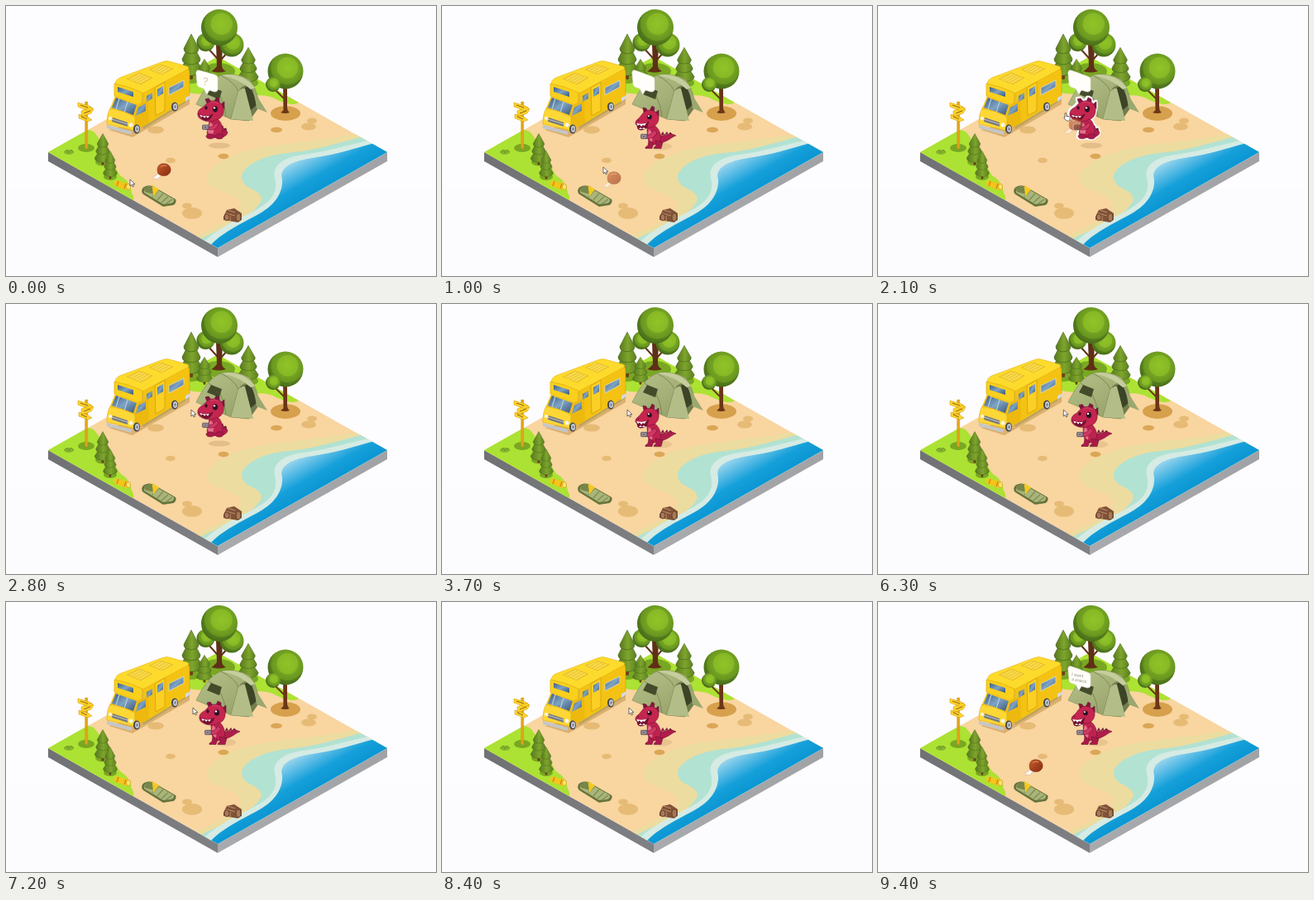
An HTML page for the animation above (9500 ms loop, 520 px wide and 327 px high).

```html
<!DOCTYPE html>
<html lang="en">
<head>
<meta charset="utf-8">
<title>Island camp</title>
<style>
html, body { margin: 0; width: 100%; height: 100%; overflow: hidden; background: #fdfcfe; }
svg { display: block; width: 100vw; height: 100vh; }
text { font-family: Inter, Arial, sans-serif; }
.ink { stroke: #6b1033; stroke-width: .55; stroke-linejoin: round; }
.glow { filter: drop-shadow(1.2px 0 0 #fff) drop-shadow(-1.2px 0 0 #fff) drop-shadow(0 1.2px 0 #fff) drop-shadow(0 -1.2px 0 #fff); }
</style>
</head>
<body>
<svg viewBox="0 0 520 327" xmlns="http://www.w3.org/2000/svg">
<defs>
  <linearGradient id="sea" gradientUnits="userSpaceOnUse" x1="340" y1="190" x2="364" y2="232">
    <stop offset="0" stop-color="#a6daf0"/><stop offset=".3" stop-color="#62bfe6"/>
    <stop offset=".65" stop-color="#16a0da"/><stop offset="1" stop-color="#0a96d3"/>
  </linearGradient>
  <linearGradient id="sideL"><stop offset="0" stop-color="#707174"/><stop offset="1" stop-color="#7f8083"/></linearGradient>
  <linearGradient id="sideR"><stop offset="0" stop-color="#a9aaae"/><stop offset="1" stop-color="#a1a2a6"/></linearGradient>
  <radialGradient id="leaf" cx=".56" cy=".4" r=".64">
    <stop offset="0" stop-color="#90c428"/><stop offset=".45" stop-color="#86b825"/>
    <stop offset=".48" stop-color="#74a322"/><stop offset=".72" stop-color="#67941f"/>
    <stop offset=".75" stop-color="#547d1c"/><stop offset="1" stop-color="#456719"/>
  </radialGradient>
  <linearGradient id="needle"><stop offset="0" stop-color="#58791f"/><stop offset=".55" stop-color="#7ea52c"/><stop offset="1" stop-color="#5c8021"/></linearGradient>
  <linearGradient id="cloth" x1="0" y1="0" x2="1" y2="1"><stop offset="0" stop-color="#b7c18b"/><stop offset=".5" stop-color="#a4b077"/><stop offset="1" stop-color="#8c9a62"/></linearGradient>
  <linearGradient id="glass" x1="0" y1="0" x2="1" y2="1"><stop offset="0" stop-color="#3f5d80"/><stop offset=".5" stop-color="#7ea3c4"/><stop offset="1" stop-color="#3a5575"/></linearGradient>
  <linearGradient id="roast" x1="0" y1="0" x2="1" y2="1"><stop offset="0" stop-color="#c8602a"/><stop offset="1" stop-color="#872813"/></linearGradient>
  <pattern id="vent" width="3" height="3" patternUnits="userSpaceOnUse" patternTransform="rotate(-30)"><path d="M0 1H3" stroke="#dfa80f" stroke-width=".9"/></pattern>
  <clipPath id="top"><path d="M51 177L256 61 461 177 256 293Z"/></clipPath>
  <g id="pine">
    <path d="M-2-9V0Q0 2 2 0V-9" fill="#6e3d18"/>
    <g fill="url(#needle)" stroke="#41601a" stroke-width=".6" stroke-linejoin="round">
      <path d="M-5-24L-13-11Q-13-7 -8-5Q0-2 8-5Q13-7 13-11L5-24Z"/>
      <path d="M-4-36L-11-23Q-11-19 -7-18Q0-15 7-18Q11-19 11-23L4-36Z"/>
      <path d="M0-52L-9-35Q-9-31 -5-30Q0-28 5-30Q9-31 9-35Z"/>
    </g>
  </g>
  <g id="wheel"><ellipse rx="4" ry="5.600" fill="#45474e"/><ellipse cx=".6" rx="2.600" ry="4" fill="#c3c7cc"/><ellipse cx=".6" rx="1.100" ry="1.700" fill="#777b83"/></g>
  <g id="meat">
    <path d="M186 201L180.500 206Q177.500 206 178 208.500Q179 210 181 209Q183 211 184.500 208.500L189 204Z" fill="#fffaf2" stroke="#bf9f88" stroke-width=".5"/>
    <path d="M184 203C182 198 183 192 189 191C196 190 200 195 199 200C197 207 188 207 184 203Z" fill="url(#roast)" stroke="#7d2612" stroke-width=".5"/>
    <path d="M187 195Q190 192 194 193.500" fill="none" stroke="#e29058" stroke-width="1"/>
  </g>
  <g id="camera">
    <rect x="-3.500" y="-2.700" width="7.500" height="5.400" rx="1" fill="#8f8790" stroke="#463a48" stroke-width=".6"/>
    <circle r="1.900" fill="#dde6e8" stroke="#463a48" stroke-width=".4"/><circle r=".8" fill="#52606c"/>
  </g>
  <g id="front" class="ink">
    <path d="M243 118L241 113 245 112 248 116M252 116L254 111 258 113 258 118M259 120L264 116 264 125" fill="#83163f"/>
    <path d="M243 118C248 113 259 114 262 121C265 128 262 137 254 138C250 141 240 141 234 136C230 132 232 126 236 124C239 123 240 120 243 118Z" fill="#c4264f"/>
    <path d="M233 131Q242 136 250 131Q248 139 241 139Q235 137 233 131Z" fill="#741130"/>
    <path d="M234 132L236 135 238 133.500 240 136 242 134 244 136 246 133 249 132Q242 135.500 234 132Z" fill="#fff" stroke="none"/>
    <ellipse cx="253" cy="125" rx="3" ry="3.600" fill="#24131f"/><circle cx="252" cy="123.500" r="1.200" fill="#fff" stroke="none"/>
    <ellipse cx="242" cy="123.500" rx="1.400" ry="2" fill="#24131f"/>
    <path d="M247 117Q252 115 257 118" fill="none" stroke="#e05a80"/>
  </g>
  <g id="stand" class="ink">
    <path d="M260 155C266 159 273 155 278 155Q281 156 283 157C278 158 272 166 261 166Z" fill="#b01d4b"/>
    <path d="M265 156L267 152.500 269 156.500 272 152.500 273.500 156 276 153 278 155" fill="#7f153d"/>
    <path d="M248 144C255 141 262 147 264 155C266 163 262 168 255 168C248 167 248 155 248 144Z" fill="#bf234f"/>
    <path d="M250 149Q256 152 254 165Q249 163 249 153Z" fill="#e4708c" stroke="none"/>
    <path d="M250 163L249 169 246 171 246 172.500H254L256 166ZM258 163L259 169 256.500 171V172.500H265L267 165Z" fill="#a91a49"/>
    <path d="M256 150C254 155 250 157 246 156L245 160C252 162 258 159 260 153Z" fill="#d03862"/>
    <use href="#camera" x="244" y="158"/>
  </g>
</defs>

<rect width="520" height="327" fill="#fdfcfe"/><path d="M0 220H520V327H0Z" fill="#fcfbfd"/>
<path d="M51 177L256 293V304L51 188Z" fill="url(#sideL)"/><path d="M256 293L461 177V188L256 304Z" fill="url(#sideR)"/>
<g clip-path="url(#top)">
  <path d="M51 177L256 61 461 177 256 293Z" fill="#f9d5a0"/>
  <path d="M437 153C405 159 365 164 323 169C280 174 239 194 243 211C247 225 280 226 284 239C284 258 252 265 225 281L256 300 470 180Z" fill="#ecdc9f"/>
  <path d="M437 157C400 166 375 175 341 178C307 181 285 196 285 207C286 224 309 220 309 235C299 257 258 270 233 283L256 302 470 180Z" fill="#b2e2d2"/>
  <path d="M446 161C415 168 385 177 360 180C334 183 322 194 325 208C329 222 324 235 304 246C280 259 259 267 239 286L256 304 470 180Z" fill="#d5ebe4"/>
  <path d="M446 166C419 173 399 180 371 184C343 188 330 197 334 210C335 226 326 242 302 254C279 266 259 277 248 289L256 304 470 178Z" fill="url(#sea)"/>
  <path d="M48 178L90 153C99 148 106 150 110 157C115 165 122 170 125 179C131 187 132 199 139 206C148 211 151 219 152 226Q155 230 154 238L145 239Z" fill="#ace233"/>
  <path d="M204 91L256 61 354 117C348 122 331 116 323 111C302 104 292 112 276 107C252 102 235 111 216 103Z" fill="#ace233"/>
  <g fill="#79a723">
    <ellipse cx="257" cy="79" rx="20" ry="10"/><ellipse cx="224" cy="88" rx="13" ry="6"/><ellipse cx="293" cy="93" rx="12" ry="6"/>
    <ellipse cx="97" cy="172" rx="10" ry="5"/><ellipse cx="117" cy="189" rx="9" ry="4.500"/><ellipse cx="126" cy="207" rx="8" ry="4"/>
  </g>
</g>
<g fill="#e3b76f" opacity=".85">
  <ellipse cx="181" cy="150" rx="10" ry="4.500"/><ellipse cx="199" cy="187" rx="6" ry="3.300"/>
  <ellipse cx="225" cy="251" rx="12" ry="7"/><ellipse cx="219" cy="242" rx="6" ry="3.500"/>
  <ellipse cx="263" cy="182" rx="6.500" ry="3.300" fill="#d59f4a"/><ellipse cx="327" cy="150" rx="7" ry="3.300" fill="#d59f4a"/>
  <ellipse cx="366" cy="146" rx="9" ry="4.500"/><ellipse cx="370" cy="139" rx="6" ry="3.500"/>
</g>
<ellipse cx="76" cy="177" rx="6" ry="3" fill="#86b52c"/><path d="M71 177L74 174 76 178 79 174 82 177" fill="none" stroke="#668d26" stroke-width=".8"/>

<use href="#pine" transform="translate(224 88) scale(1 1.040)"/>
<path d="M254 46L255 73Q251 78 248 79Q257 82 266 79Q261 77 261 71L262 46" fill="#5f3015"/>
<path d="M256 64L245 52M260 65L269 55" stroke="#5f3015" stroke-width="2"/>
<g fill="url(#leaf)"><circle cx="241.500" cy="44" r="11"/><circle cx="273" cy="47" r="14.500"/><circle cx="258" cy="26" r="22"/></g>
<use href="#pine" transform="translate(240 97) scale(.74 .63)"/>
<use href="#pine" transform="translate(293 95) scale(.93 .86)"/>
<ellipse cx="338" cy="130" rx="18" ry="9" fill="#d6a04c"/>
<path d="M335 95L335.500 126Q334 128 332 129Q338 131 343 129Q340 127 340 122V96Z" fill="#6b3517"/><path d="M336 112L324 100" stroke="#6b3517" stroke-width="1.800"/>
<g fill="url(#leaf)"><circle cx="338" cy="79" r="21.500"/><circle cx="323" cy="95" r="9"/></g>

<g id="tent" stroke-linejoin="round">
  <path d="M230 119C237 105 246 89 260 84Q277 80 294 89C300 95 305 107 306 122L294 139 272 137Z" fill="url(#cloth)" stroke="#7c8955" stroke-width=".6"/>
  <path d="M260 84Q276 92 281 103L272 137M245 96Q263 104 266 134" fill="none" stroke="#7b8953" stroke-width="1"/>
  <path d="M248 98L261 103 258 113 243 107Z" fill="#434b2b"/>
  <path d="M281 103Q285 96 294 95Q303 104 306 122L294 139 272 137Z" fill="#717d4c"/>
  <path d="M287 101Q291 97 294 97Q302 107 303 120L296 126Z" fill="#3c4427"/>
  <path d="M281 103Q286 99 289 100L299 139 272 137Z" fill="#b3bd87"/>
  <path d="M295 96Q305 111 316 129L303 124Q301 107 295 96Z" fill="#9ba870"/>
  <path d="M260 84Q285 79 301 99L296 101Q282 88 260 84Z" fill="#c5cd9d"/>
</g>

<g id="camper" stroke-linejoin="round">
  <path d="M124 150L153 159 222 119 222 112 166 140Z" fill="#c8984f" opacity=".6"/>
  <path d="M165 105L219 75Q222 76 222 81V113L166 148Z" fill="#f3c213" stroke="#d39e0a" stroke-width=".6"/>
  <path d="M132 94Q133 88 140 86L188 68Q194 65 201 68L219 73Q223 75 219 77L165 106Z" fill="#fddb2c" stroke="#e3b214" stroke-width=".6"/>
  <path d="M131 94Q149 97 165 105L164 122 131 109Z" fill="#fad01c" stroke="#d7a50c" stroke-width=".6"/>
  <path d="M135 98L154 104 154 110 135 104Z" fill="url(#glass)"/>
  <path d="M146 88L161 81 177 87 163 95ZM173 77L187 71 202 76 188 83Z" fill="#fde55a" stroke="#dcab16" stroke-width=".5"/>
  <path d="M146 88L161 81 177 87 163 95ZM173 77L187 71 202 76 188 83Z" fill="url(#vent)"/>
  <path d="M132 109L160 119 156 136 125 126Z" fill="#f5c51a"/>
  <path d="M133 111L158 120 154 132 128 123Z" fill="url(#glass)"/>
  <path d="M137 112L133 125M147 116L143 129" stroke="#b4cbdc" stroke-width="1.200"/>
  <path d="M160 119L172 114 173 142 155 150 154 135Z" fill="#eeb90f"/>
  <path d="M160 123L169 118V127L157 133Z" fill="url(#glass)"/>
  <path d="M126 124Q141 126 156 134L156 151 122 143Q122 130 126 124Z" fill="#fdd736" stroke="#dba90f" stroke-width=".6"/>
  <path d="M129 135L147 141V146L128 140Z" fill="#777a80"/><path d="M128 137L147 143" stroke="#d6d8da" stroke-width=".8"/>
  <circle cx="126" cy="136" r="2" fill="#f5f6f2"/><circle cx="151" cy="144" r="2.500" fill="#f5f6f2"/>
  <path d="M122 144L152 152V156L122 148Z" fill="#c3c6ca"/>
  <path d="M180 99L192 92V127L181 133Z" fill="#fbcf24" stroke="#cd990a" stroke-width=".7"/>
  <path d="M183 101L190 97V106L183 110Z" fill="url(#glass)"/>
  <path d="M197 99L215 90V98L197 108Z" fill="url(#glass)" stroke="#e0e5e6" stroke-width=".7"/>
  <path d="M170 109L177 105V112L170 116Z" fill="url(#glass)"/>
  <path d="M166 146L222 112V114L166 149Z" fill="#b9a362"/>
  <use href="#wheel" x="158" y="149"/><use href="#wheel" x="204" y="122"/>
  <path d="M217 111L223 108V112L217 116Z" fill="#d6d8dc"/>
</g>

<g stroke="#cf9707" stroke-width=".5">
  <path d="M95.700 116H98.700V172Q97 174 95.700 172Z" fill="#e2a51d"/>
  <path d="M87 117L101 121 105 125 100 127 87 122ZM91 127L103 122 106 125 103 130 91 134ZM88 131L100 135 104 138 99 140 88 136Z" fill="#fdd42c"/>
  <path d="M90 120L99 123M94 130L102 127M91 134L98 137" stroke="#896412" stroke-width="1"/>
</g>
<use href="#pine" transform="translate(117 192) scale(.75 .72)"/><use href="#pine" transform="translate(126 209) scale(.65 .64)"/>
<g>
  <path d="M133 211L148 215Q152 217 150 221L146 223 132 218Q129 214 133 211Z" fill="#f4c51d"/>
  <path d="M136 212L134 218M145 215L143 221" stroke="#d48d0e" stroke-width="1.500"/><ellipse cx="148" cy="219" rx="2.500" ry="3.500" fill="#ffe572" stroke="#d09712" stroke-width=".7"/>
</g>
<g>
  <path d="M165 221Q169 216 177 218L205 234Q207 237 203 241L190 243 166 228Q163 225 165 221Z" fill="#66733a"/>
  <path d="M167 222Q170 217 177 219L203 234Q204 237 200 239L190 240 167 226Z" fill="#a9b57a"/>
  <path d="M184 224L177 231M190 227L183 235M196 231L188 238M201 234L193 240" stroke="#7f8d52" stroke-width="1.200"/>
  <path d="M167 222Q170 217 176 218L179 228 168 225Z" fill="#77864a"/><path d="M177 217L185 222 178 231Z" fill="#f6c91e"/>
</g>
<g>
  <path d="M263 255L267 247 276 245 285 251V259L280 262 263 259Z" fill="#805238"/>
  <path d="M268 247L277 250M266 251L277 254M271 254V260" stroke="#b98c69" stroke-width="1.200"/>
  <ellipse cx="281" cy="256" rx="3" ry="5" fill="#a57956" stroke="#60391f" stroke-width=".8"/><ellipse cx="267" cy="256" rx="3" ry="4" fill="#a9785a" stroke="#57341f" stroke-width=".8"/>
</g>

<use id="food" href="#meat"/>
<ellipse id="shade" fill="#b98f58"/>
<g id="bubble">
  <path id="balloon" fill="#fffefa" stroke="#e2ded2" stroke-width=".6"/>
  <text id="ask" x="241" y="96" font-size="13" fill="#d2c9ad" transform="rotate(8 241 92)" text-anchor="middle">?</text>
  <g id="words" font-size="5" fill="#8d887d" transform="translate(234 89) rotate(10)"><text>I want</text><text x="1" y="6">a snack</text></g>
</g>
<g id="dino">
  <g id="sit">
    <g class="ink">
      <path d="M254 146C259 151 265 149 268 153C268 158 260 161 253 158Z" fill="#b01d4b"/>
      <path d="M259 148L262 145 263 149 266 148 267 152" fill="#7f153d"/>
      <path d="M247 135C256 133 262 142 262 151C262 161 245 163 243 154Z" fill="#bf234f"/>
      <path d="M247 141Q254 145 250 157Q243 157 244 149Z" fill="#e4708c" stroke="none"/>
      <ellipse cx="247" cy="158" rx="5" ry="3" fill="#a91a49"/><ellipse cx="258" cy="158" rx="5" ry="3.200" fill="#a91a49"/>
      <path d="M254 141Q250 149 241 146V149Q253 153 257 144Z" fill="#d03862"/>
      <use href="#camera" x="241" y="147"/>
    </g><use href="#front"/>
  </g>
  <g id="up">
    <use href="#stand"/>
    <use id="idle" href="#front"/>
    <g id="look" class="ink">
      <path d="M244 129L243 123 247 124 249 128M251 127L254 121 257 123 256 129M257 130L262 126 262 134" fill="#83163f"/>
      <path d="M245 128C251 124 260 127 262 134C263 142 257 147 251 147L239 150Q236 149 237 145L234 143Q233 139 238 136C241 133 242 130 245 128Z" fill="#c4264f"/>
      <path d="M235 142Q243 145 250 140L248 147Q242 152 237 149Z" fill="#741130"/>
      <path d="M235 142L237 145 239 143.500 241 146 243 144 245 145 247 142 249 141Q243 144 235 142ZM238 149L240 147 242 149 244 147 246 149Z" fill="#fff" stroke="none"/>
      <circle cx="251" cy="134.500" r="2.800" fill="#24131f"/><circle cx="250" cy="133.300" r="1" fill="#fff" stroke="none"/>
      <circle cx="237.500" cy="139" r=".6" fill="#570a2b"/>
    </g>
  </g>
</g>
<use id="drag" href="#meat" opacity=".58"/>
<g id="mouse">
  <path id="arrow" d="M0 0V8L1.900 6.300 3.200 9 4.600 8.300 3.300 5.800H6Z" fill="#fff" stroke="#353535" stroke-width=".7"/>
  <path id="hand" d="M0 0Q1-1 2 0V4L3 3 4 4 5 3.500 6 5V8Q5 10 2 9L-1 6Q-1 4 0 5Z" fill="#fff" stroke="#353535" stroke-width=".7"/>
</g>
</svg>
<script>
const LOOP = 9500, HOP = 700, PEAK = 12;
const $ = id => document.getElementById(id);
const show = (id, on) => $(id).style.display = on ? "" : "none";
const put = (id, x, y) => $(id).setAttribute("transform", `translate(${x} ${y})`);
const ease = k => k * k * (3 - 2 * k);
const rise = beat => PEAK * (1 - ((beat - 75) / 115) ** 2);
const stops = [
  [0, 150, 210], [550, 178, 185], [700, 178, 185], [1000, 195, 195],
  [1900, 226, 130], [2300, 226, 130], [2800, 224, 128], [6100, 224, 128],
  [6900, 226, 128], [9100, 226, 128], [9300, 479, 38], [LOOP, 479, 38]
];

function pointer(t) {
  const i = stops.findIndex(p => p[0] > t);
  const [a, x, y] = stops[i - 1], [b, u, v] = stops[i];
  const k = ease((t - a) / (b - a));
  return [x + (u - x) * k, y + (v - y) * k];
}

function balloon(wide) {
  const x = 256 + wide, y = 84 + wide * 2;
  return `M234 78Q229 77 230 83L231 94Q231 98 236 99L239 100 243 107 246 102 ${x - 4} 104Q${x + 1} 104 ${x} 99V${y + 3}Q${x} ${y} ${x - 4} ${y - 1}Z`;
}

function draw(t) {
  const [x, y] = pointer(t);
  const over = t >= 1900 && t < 2300;
  put("mouse", x, y);
  show("mouse", t < 9350);
  show("hand", over);
  show("arrow", !over);
  put("drag", x - 178, y - 185);
  show("drag", t >= 700 && t < 2300);
  show("food", t < 700 || t >= 8700);

  const beat = t % HOP;
  const lift = rise(beat > 600 ? beat - HOP : beat);
  const hop = t < 5900 && lift > 0;
  const idle = t < 6100 ? beat >= 450 : t < 8200;
  const bob = t > 6100 && t < 8100 ? Math.sin((t - 7200) / 1000 * Math.PI * 2) * .7 : 0;
  put("sit", 0, rise(0) - lift);
  put("idle", 2, 9 + bob);
  show("sit", hop);
  show("up", !hop);
  show("idle", idle);
  show("look", !idle);
  $("dino").setAttribute("class", over ? "glow" : "");
  for (const [key, val] of Object.entries(hop
    ? { cx: 258, cy: 169, rx: 13, ry: 3.5, opacity: .32 }
    : { cx: 264, cy: 170, rx: 14, ry: 4.5, opacity: .24 })) $("shade").setAttribute(key, val);

  show("bubble", t < 2500 || t >= 8600);
  show("ask", t < 600);
  show("words", t >= 8800);
  $("balloon").setAttribute("d", balloon(t < 600 ? 0 : 1));
  const size = t >= 8600 ? Math.min(1, (t - 8600) / 200) : t > 2300 ? Math.max(0, (2500 - t) / 200) : 1;
  $("bubble").setAttribute("transform", `translate(243 106) scale(${size}) translate(-243 -106)`);
}

const start = performance.now();
function tick() {
  draw((performance.now() - start) % LOOP);
  requestAnimationFrame(tick);
}
draw(0);
requestAnimationFrame(tick);
</script>
</body>
</html>
```
